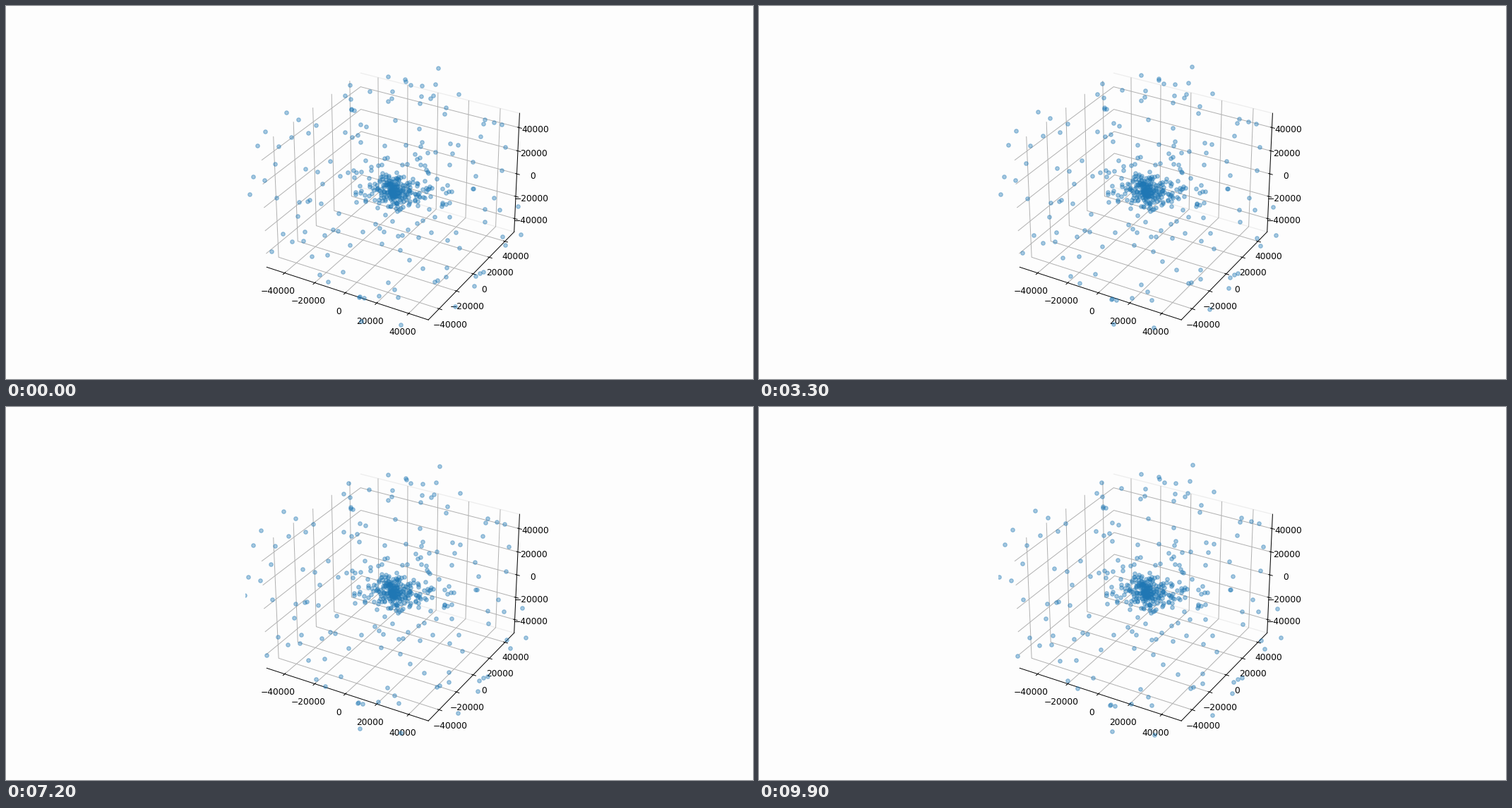
A matplotlib script that plays this animation: 1058x529 px, repeating every 10 s.

```python
import matplotlib.pyplot as plt
import numpy as np
from matplotlib.animation import FuncAnimation

W, H = 1058, 529
FRAMES, STEP_MS = 100, 100
PAPER = "#fdfdfd"
LIMIT = 50000 * 25 / 24
CENTRE = np.array([549.5, 262])

# The outermost dots fix the silhouette; all others are random.
RIM = np.array([
    (612, 88), (541, 100), (487, 112), (397, 151), (367, 178), (356, 198),
    (350, 242), (345, 267), (366, 247), (376, 348), (503, 447), (559, 452),
    (636, 426), (663, 397), (707, 339), (729, 324),
])

rng = np.random.default_rng(12)


def ring(count, inner, outer):
    """Dots that thin out evenly with distance, at random angles."""
    radius = rng.uniform(inner, outer, (count, 1))
    angle = rng.uniform(0, 2 * np.pi, count)
    return CENTRE + radius * np.column_stack([np.cos(angle),
                                              0.9 * np.sin(angle)])


def blob(count, width, height):
    return rng.normal(CENTRE, (width, height), (count, 2))


start = np.vstack([RIM, ring(155, 45, 185), blob(150, 22, 16),
                   blob(90, 9, 9)])

# Dots recede from the centre; those lower on the stage are nearer and faster.
offset = start - CENTRE
drift = offset * (0.05 + 0.0001 * offset[:, 1:])

fig = plt.figure(figsize=(12, 6), dpi=88.17, facecolor=PAPER)

box = fig.add_subplot(projection="3d", facecolor=PAPER)
box.set(xlim=(-LIMIT, LIMIT), ylim=(-LIMIT, LIMIT), zlim=(-LIMIT, LIMIT))
for axis in (box.xaxis, box.yaxis, box.zaxis):
    axis.set_ticks(range(-40000, 40001, 20000))
    axis.set_pane_color(PAPER)
box.yaxis.pane.set_edgecolor("#ededed")
box.zaxis.pane.set_visible(False)

# Flat layer over the square that the box occupies; it clips the dots.
side = 0.77 * H
left = 0.5125 * W - side / 2
bottom = 0.89 * H
layer = fig.add_axes((left / W, 0.11, side / W, 0.77), zorder=2)
layer.axis("off")
layer.set(xlim=(left, left + side), ylim=(bottom, bottom - side))
dots = layer.scatter(*start.T, s=20, color="#1f77b4", alpha=0.4)


def draw(i):
    dots.set_offsets(start + drift * i / (FRAMES - 1))
    return (dots,)


anim = FuncAnimation(fig, draw, frames=FRAMES, interval=STEP_MS, repeat=True,
                     repeat_delay=0)
plt.show()
```
